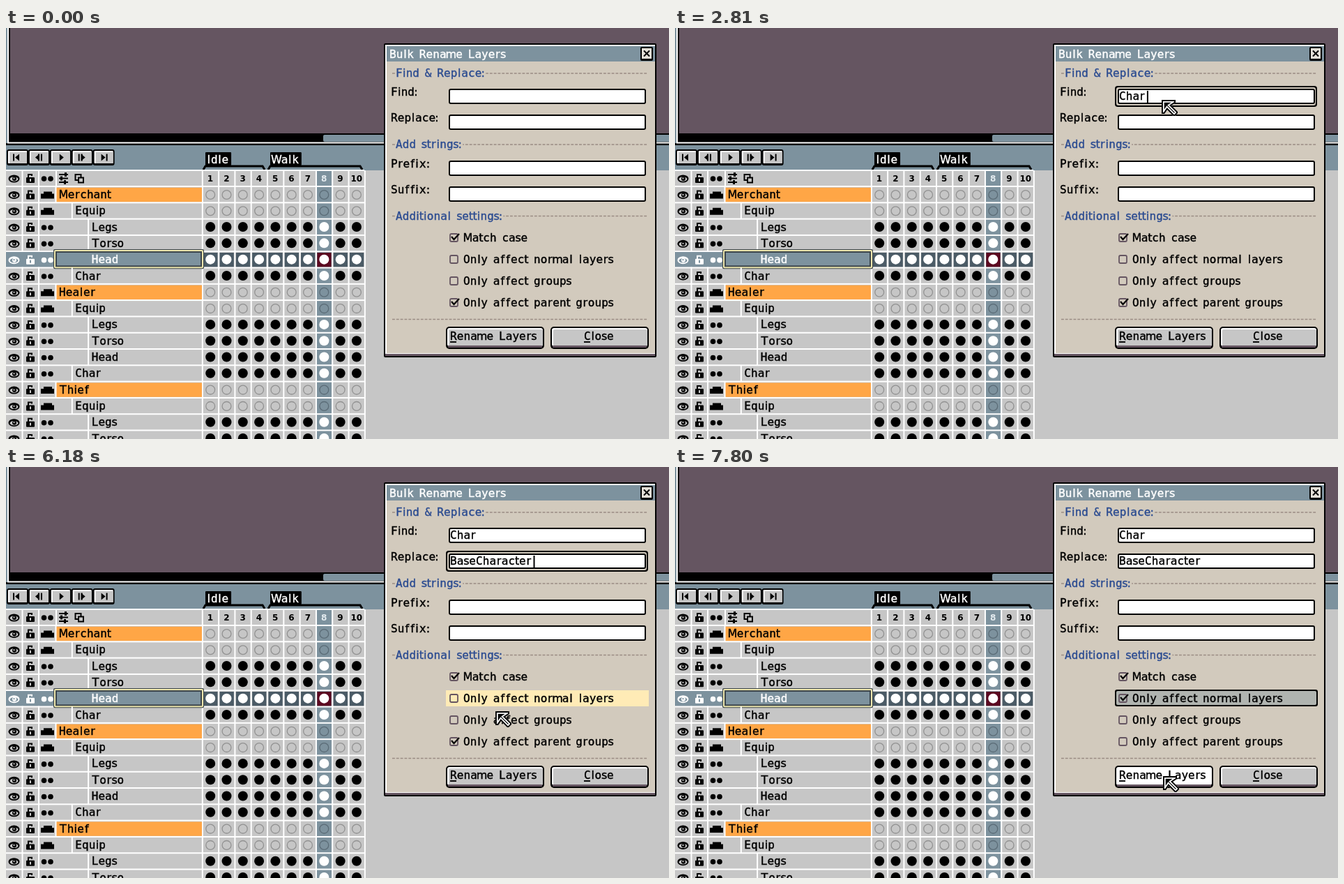
These frames come from a looping animation (951 px wide and 589 px high, 8 s). An HTML page with a canvas:

```html
<!DOCTYPE html>
<html lang="en">
<head>
<meta charset="utf-8">
<title>Bulk rename dialog</title>
<style>
html, body { margin: 0; width: 100%; height: 100%; overflow: hidden; background: #c6c6c6; }
canvas { display: block; }
</style>
</head>
<body>
<canvas id="stage" width="951" height="589"></canvas>
<script>
const W = 951, H = 589, LOOP = 8000;
const PX = 1.942;            // size of one interface pixel
const ROW = 12 * PX;
const BLUE = '#7d929e', GRAY = '#c6c6c6', BEIGE = '#d2cabd', PLUM = '#655561';

const stage = document.getElementById('stage').getContext('2d');
let c = stage;

function box(x, y, w, h, color) {
  c.fillStyle = color;
  c.fillRect(x, y, w, h);
}

function round(x, y, w, h, r, color) {
  c.fillStyle = color;
  c.beginPath();
  c.roundRect(x, y, w, h, r);
  c.fill();
}

function poly(points, color) {
  c.beginPath();
  points.forEach(([x, y]) => c.lineTo(x, y));
  c.closePath();
  c.fillStyle = color;
  c.fill();
}

function line(points, color, width = 2) {
  c.beginPath();
  points.forEach(([x, y]) => c.lineTo(x, y));
  c.strokeStyle = color;
  c.lineWidth = width;
  c.stroke();
}

function disc(x, y, r, color) {
  c.fillStyle = color;
  c.beginPath();
  c.arc(x, y, r, 0, Math.PI * 2);
  c.fill();
}

// Letters sit on a pixel grid: most take five cells, the rest are listed.
const CELLS = { r: 4, s: 4, f: 4, ' ': 4, t: 3, l: 3, I: 3, i: 2.5, ':': 2, M: 6.5, m: 7, W: 7, T: 6, x: 6 };
const cellsOf = ch => CELLS[ch] || 5;
const textWidth = s => [...s].reduce((sum, ch) => sum + cellsOf(ch), 0) * PX;

function text(s, x, y, color = '#000') {
  c.fillStyle = c.strokeStyle = color;
  c.lineWidth = 0.4;
  c.textAlign = 'center';
  for (const ch of s) {
    const n = cellsOf(ch), mid = x + (n - 1) * PX / 2;
    c.font = n === 5 ? '16px "DejaVu Sans Mono", monospace' : '16px "DejaVu Sans", sans-serif';
    c.fillText(ch, mid, y);
    c.strokeText(ch, mid, y);
    x += n * PX;
  }
}

function eye(x, y, color, back) {
  c.fillStyle = color;
  c.beginPath();
  c.ellipse(x, y + 1, 8, 5.5, 0, 0, Math.PI * 2);
  c.fill();
  c.fillStyle = back;
  c.beginPath();
  c.ellipse(x, y + 1.5, 5.8, 3.2, 0, 0, Math.PI * 2);
  c.fill();
  disc(x + 0.5, y + 1, 3, color);
  box(x - 1, y - 0.5, 2, 2, back);
}

function lock(x, y, color, back) {
  round(x - 6, y - 1, 12, 8, 1, color);
  line([[x - 3, y], [x - 3, y - 5], [x + 2, y - 5], [x + 2, y - 3]], color);
  box(x - 1, y + 1, 2, 4, back);
}

function folder(x, y) {
  poly([[x - 9, y + 6], [x - 9, y - 1], [x - 5, y - 1], [x - 5, y - 4], [x + 7, y - 4],
        [x + 7, y - 1], [x + 10, y - 1], [x + 10, y + 6]], '#000');
}

function icons(y, group, color, back) {
  eye(11.5, y, color, back);
  lock(35, y, color, back);
  if (group) return folder(59, y);
  disc(54.5, y + 1, 3.8, color);
  disc(64, y + 1, 3.8, color);
}

function editor() {
  box(0, 0, W, H, GRAY);
  box(0, 0, W, 168, '#000');
  box(0, 0, 2, 165, BLUE);
  box(2, 0, 2, 165, '#fff');
  box(2, 163.5, W, 2, '#fff');
  box(6, 0, W, 151, PLUM);
  round(455, 153, 500, 10, 2, BLUE);
  box(0, 168, W, 36, BLUE);
}

function player() {
  for (let i = 0; i < 5; i++) {
    const x = 2 + i * 30.9, m = x + 14, y = 185.5;
    round(x - 1, 174, 31, 23, 3, '#000');
    round(x + 1, 176, 27, 18, 1, '#fff');
    box(x + 3, 178, 25, 16, GRAY);
    const dir = i < 2 ? -1 : 1;
    const bar = [-5, 4, 0, -4, 5][i], tip = [-3, -5, 5, 5, 3][i];
    poly([[m + tip, y], [m + tip - dir * 6, y - 5], [m + tip - dir * 6, y + 5]], '#000');
    if (bar) box(m + bar - 1, y - 5, 2, 10, '#000');
    if (i === 1 || i === 3) poly([[m - dir, y - 5], [m + dir, y - 5], [m + dir, y + 5], [m - dir, y + 5]], '#000');
  }
}

function tag(name, x, end) {
  round(x, 178, textWidth(name) + 6, 19, 1, '#000');
  text(name, x + 3, 193.5, '#fff');
  line([[x - 3, 203], [x, 198], [end - 3, 198], [end, 203]], '#000', 3);
}

function header() {
  const y = 215.5;
  icons(y - 0.5, false, '#000', GRAY);
  for (let i = -1; i < 2; i++) {
    box(76, y + i * 5.5 - 1, 13, 2, '#000');
    box([84, 78, 83][i + 1], y + i * 5.5 - 3, 3, 6, '#000');
  }
  c.strokeStyle = '#000';
  c.lineWidth = 2;
  c.strokeRect(99.5, y - 5.5, 8, 8);
  box(103, y - 2, 9, 9, '#000');
  box(105, y, 5, 5, GRAY);
  box(71, 204, 2, 23, '#fff');
  c.textAlign = 'center';
  c.font = 'bold 12px "DejaVu Sans", sans-serif';
  for (let i = 0; i < 10; i++) {
    c.fillStyle = i === 7 ? '#e4ebef' : '#000';
    c.fillText(i + 1, 293 + i * ROW, 220);
  }
}

const LAYERS = ['', 'Equip', 'Legs', 'Torso', 'Head', 'Char'];
const DEPTH = [0, 1, 2, 2, 2, 1];
const GROUPS = ['Merchant', 'Healer', 'Thief'];
const SELECTED = 4;

function layerRow(i) {
  const kind = i % 6, group = kind < 2, on = i === SELECTED;
  const top = 226.8 + i * ROW, y = top + ROW / 2;
  const x = 72 + DEPTH[kind] * ROW;
  if (on) box(0, top + 1, 281, ROW - 2, BLUE);
  if (kind === 0) box(72, top + 2, 209, ROW - 3, '#ffa646');
  icons(y, group, on ? '#fff' : '#000', on ? BLUE : GRAY);
  if (!on) box(x - 1.5, top, 2, ROW, '#fff');
  for (let k = 0; k < 10; k++) {
    const cx = 293.2 + k * ROW, now = k === 7;
    if (on) box(cx - 10, top + 2, ROW - 3, ROW - 3, now ? '#5b0820' : '#4b5b66');
    if (!group) {
      disc(cx, y, 7, on || now ? '#fff' : '#000');
    } else {
      c.strokeStyle = now ? '#5b6c77' : '#929292';
      c.lineWidth = 1.3;
      c.beginPath();
      c.arc(cx, y + 0.5, 6.4, 0, Math.PI * 2);
      c.stroke();
    }
  }
  if (on) {
    round(68, top - 3, 216, ROW + 5, 2, '#3c454b');
    round(69, top - 2, 214, ROW + 3, 2, '#eee7ae');
    box(71, top, 210, ROW - 1, '#3c454b');
    box(73, top + 2, 206, ROW - 5, BLUE);
  }
  text(kind ? LAYERS[kind] : GROUPS[i / 6], x + 5, y + 5.6, on ? '#fff' : '#000');
}

function timeline() {
  box(446, 204, 21, H, BLUE);
  for (const x of [23.5, 47]) box(x - 1, 204, 2, H, '#fff');
  for (let k = 0; k <= 10; k++) box(280.8 + k * ROW, 204, 2, H, '#fff');
  for (let i = 0; i < 17; i++) box(0, 226 + i * ROW, 514, 2, '#fff');
  box(0, 203, 514, 2, '#fff');
  header();
  for (let i = 0; i < 16; i++) layerRow(i);
}

function separator(y, label) {
  c.setLineDash([2 * PX, PX]);
  line([[554, y], [921, y]], '#9a8c84', 1.6);
  c.setLineDash([]);
  if (!label) return;
  box(559, y - 4, textWidth(label) + 2, 8, BEIGE);
  text(label, 560, y + 5, '#2c4c91');
}

function dialog() {
  round(542, 22, 391, 450, 2, '#000');
  box(544, 24, 387, 446, '#fff');
  box(546, 26, 385, 22, BLUE);
  box(546, 48, 385, 418, BEIGE);
  box(544, 467, 387, 3, PLUM);
  text('Bulk Rename Layers', 551, 42.5, '#fff');
  round(910, 27, 18, 20, 2, '#000');
  box(912, 29, 14, 15, '#e4e0d8');
  line([[915, 32.5], [923, 40.5]], '#000');
  line([[923, 32.5], [915, 40.5]], '#000');
  separator(65, 'Find & Replace:');
  separator(167, 'Add strings:');
  separator(269.5, 'Additional settings:');
  separator(417.5);
  text('Find:', 553, 97);
  text('Replace:', 553, 134);
  text('Prefix:', 553, 199.5);
  text('Suffix:', 553, 236.5);
}

function field(y, value, focus, caret) {
  if (focus) {
    round(631, y - 4, 290, 30, 4, '#000');
    round(633, y - 2, 286, 26, 3, BEIGE);
  }
  round(635, y, 283, 22, 3, '#000');
  round(637, y + 2, 279, 18, 1, '#fff');
  text(value, 638, y + 15.5);
  if (caret) box(640 + textWidth(value), y + 3, 2, 17, '#000');
}

function check(y, label, on, hover, focus) {
  if (hover) box(631, y - 11, 291, 23, '#ffebb6');
  if (focus) {
    round(631, y - 12, 291, 24, 3, '#000');
    round(633, y - 10, 287, 20, 2, '#b0b4b0');
  }
  c.strokeStyle = PLUM;
  c.lineWidth = 1.8;
  c.beginPath();
  c.roundRect(637, y - 5, 11, 11, 2);
  c.stroke();
  if (on) {
    line([[639, y - 1], [642.5, y + 3], [650, y - 5]], '#000', 2.2);
  }
  text(label, 657, y + 5.5);
}

function button(x, label, tx, hover) {
  round(x, 428, 141, 32, 5, '#000');
  round(x + 2, 430, 137, 26, 3, '#fff');
  if (!hover) round(x + 4, 432, 135, 24, 2, GRAY);
  round(x + 3, 455, 135, 3, 1, PLUM);
  text(label, tx, 447);
  box(tx - 1, 449, 9, 1.9, '#000');
}

function arrow(x, y) {
  c.save();
  c.translate(x, y);
  poly([[0, 0], [20, 0], [20, 4], [14, 8], [23, 17], [23, 19], [19, 23], [17, 23],
        [8, 14], [4, 20], [0, 20]], '#000');
  c.clip();
  c.lineWidth = 7.4;
  c.strokeStyle = '#fff';
  c.stroke();
  c.lineWidth = 3.8;
  c.strokeStyle = '#000';
  c.stroke();
  c.restore();
}

// Pointer stops: time, x, y, hovered item (1-4 checkboxes, 5 button)
const POINTER = [
  [100, 924, 568, 0], [200, 882, 445, 0], [300, 812, 285, 0], [400, 742, 165, 0],
  [500, 706, 113, 0], [610, 698, 103, 0],
  [3250, 698, 109, 0], [3350, 698, 122, 0], [3450, 698, 131, 0], [3540, 698, 134, 0],
  [5870, 699, 160, 0], [5980, 700, 240, 0], [6080, 701, 325, 0], [6180, 702, 350, 2],
  [6280, 716, 384, 3], [6380, 733, 367, 4], [6480, 742, 348, 3], [6580, 743, 344, 0],
  [6680, 741, 337, 2], [6780, 738, 333, 2],
  [7280, 730, 368, 0], [7380, 714, 420, 0], [7500, 704, 441, 5], [7600, 702, 444, 5], [7800, 700, 443, 5]
];
const FIND = [2520, 2720, 2720, 2810];
const REPLACE = [3840, 4060, 4160, 4260, 4760, 4970, 5070, 5160, 5270, 5370, 5570, 5670, 5770];
const BLINK = [700, 1200, 1710, 2220, 2520, 3350, 3640, 6280, 6780, 7180];

const passed = (times, t) => times.filter(k => k <= t).length;

function drawLive(t) {
  const caret = passed(BLINK, t) % 2 === 1;
  const inFind = t >= 700 && t < 3640, inReplace = t >= 3640 && t < 7180;
  const picked = t >= 7180;
  const at = POINTER.filter(p => p[0] <= t).pop();
  const hover = at ? at[3] : 0;
  field(87, 'Char'.slice(0, passed(FIND, t)), inFind, inFind && caret);
  field(124, 'BaseCharacter'.slice(0, passed(REPLACE, t)), inReplace, inReplace && caret);
  field(190, '');
  field(227, '');
  check(300, 'Match case', true, hover === 1);
  check(331, 'Only affect normal layers', picked, hover === 2 && !picked, picked);
  check(362, 'Only affect groups', false, hover === 3);
  check(393, 'Only affect parent groups', !picked, hover === 4);
  button(631, 'Rename Layers', 638, hover === 5);
  button(781, 'Close', 830, false);
  if (at) arrow(at[1], at[2]);
}

const backdrop = document.createElement('canvas');
backdrop.width = W;
backdrop.height = H;
c = backdrop.getContext('2d');
editor();
player();
tag('Idle', 286, 371);
tag('Walk', 379, 511);
timeline();
dialog();
c = stage;

const start = performance.now();
function tick() {
  c.drawImage(backdrop, 0, 0);
  drawLive((performance.now() - start) % LOOP);
  requestAnimationFrame(tick);
}
tick();
</script>
</body>
</html>
```
